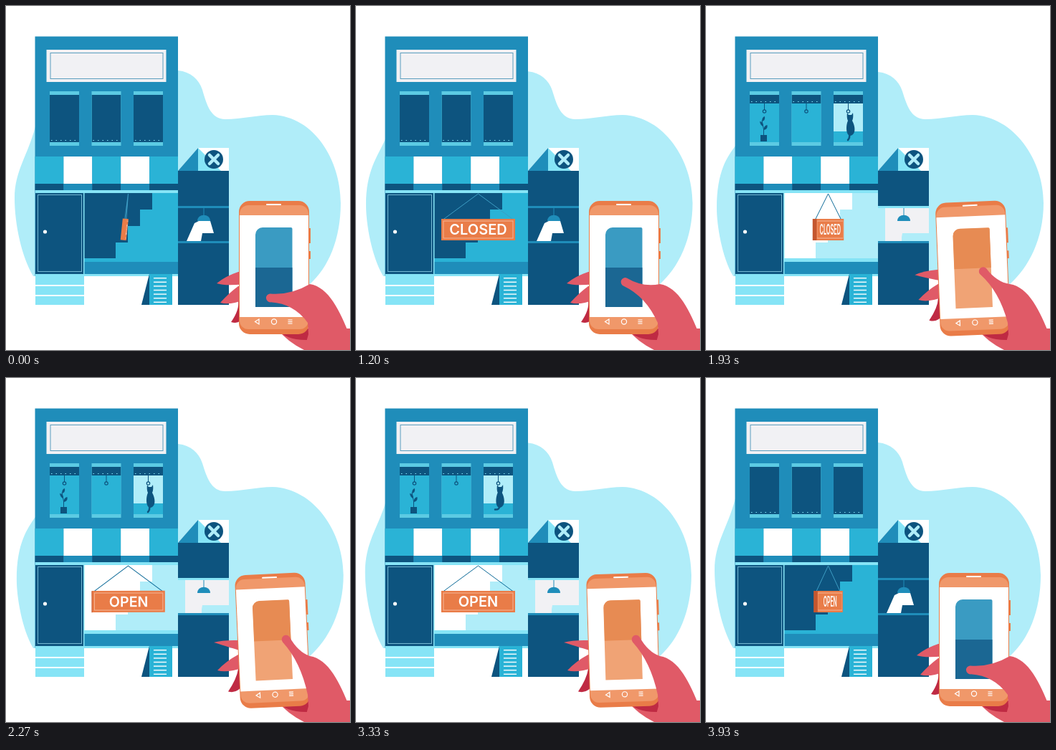
Write an HTML page with a canvas that moves like this. It is 480 by 480 pixels and loops after 3990 ms.

```html
<!DOCTYPE html>
<html lang="en">
<head>
<meta charset="utf-8">
<title>Shop opening</title>
<style>
html, body { margin: 0; width: 100%; height: 100%; overflow: hidden; background: #fff; }
canvas { display: block; width: 480px; height: 480px; }
</style>
</head>
<body>
<canvas id="stage" width="480" height="480"></canvas>
<script>
const ctx = document.getElementById('stage').getContext('2d');
const LOOP = 3990, HALF = LOOP / 2;
const NAVY = '#0d547f', BLUE = '#1f8dba', TEAL = '#2ab3d6', SKY = '#5ccbe3',
      PALE = '#b0edf9', ICE = '#86e4f6', WHITE = '#ffffff', PAPER = '#f1f1f4',
      ORANGE = '#e97c48', PEACH = '#f0986a', PINK = '#e05a67', RED = '#bf2a43';

const clamp = x => Math.max(0, Math.min(1, x));
const lerp = (a, b, k) => a + (b - a) * k;
const smooth = x => { x = clamp(x); return x * x * (3 - 2 * x); };
const span = (t, a, b) => smooth((t - a) / (b - a));
// Rises during a..b, falls during c..d
const pulse = (t, a, b, c, d) => span(t, a, b) * (1 - span(t, c, d));

function mix(a, b, k) {
  const part = (c, i) => parseInt(c.substr(1 + i * 2, 2), 16);
  return 'rgb(' + [0, 1, 2].map(i => Math.round(lerp(part(a, i), part(b, i), k))) + ')';
}

function rect(x, y, w, h, fill) {
  ctx.fillStyle = fill;
  ctx.fillRect(x, y, w, h);
}

function round(x, y, w, h, r, fill) {
  ctx.beginPath();
  ctx.roundRect(x, y, w, h, r);
  ctx.fillStyle = fill;
  ctx.fill();
}

function shape(fill, d) {
  ctx.fillStyle = fill;
  ctx.fill(new Path2D(d));
}

function stroke(color, width, d) {
  ctx.strokeStyle = color;
  ctx.lineWidth = width;
  ctx.stroke(new Path2D(d));
}

function frame(x, y, w, h, color) {
  ctx.strokeStyle = color;
  ctx.lineWidth = 1;
  ctx.strokeRect(x + .5, y + .5, w - 1, h - 1);
}

function circle(x, y, r) {
  ctx.beginPath();
  ctx.arc(x, y, r, 0, 7);
}

function disc(x, y, r, fill) {
  circle(x, y, r);
  ctx.fillStyle = fill;
  ctx.fill();
}

function ring(x, y, r, color) {
  circle(x, y, r);
  ctx.strokeStyle = color;
  ctx.lineWidth = 1.2;
  ctx.stroke();
}

function pose(x, y, angle, draw) {
  ctx.save();
  ctx.translate(x, y);
  ctx.rotate(angle * Math.PI / 180);
  draw();
  ctx.restore();
}

function blob(t) {
  const s = Math.sin(Math.PI * t / LOOP) ** 2;
  const left = 12 + 3 * s, right = 467 + 4 * s, top = 90 + 2 * s;
  shape(PALE, `M200 ${top} H240 C258 ${top + 2} 269 ${top + 12} 274 ${top + 27} ` +
    `C280 138 286 158 306 158 C330 158 350 152 372 152 ` +
    `C430 154 ${right} 215 ${right} 275 C${right} 325 450 365 424 388 L400 377 H38 ` +
    `C22 350 ${left} 305 ${left} ${268 + 14 * s} C${left} 230 30 210 41 ${168 + 27 * s} Z`);
}

function plant() {
  rect(76, 180, 9, 9, NAVY);
  stroke(NAVY, 1, 'M80.5 181 V172 L78 160');
  for (const [x, y, side] of [[80.5, 173, 5], [80, 168, -5], [78, 161, 4]])
    shape(NAVY, `M${x} ${y} q0 -6 ${side} -7 q1 6 ${-side} 7`);
}

function cat(t) {
  const sit = pulse(t, 2300, 2700, 3150, 3550);
  pose(201, 152, 3 * sit, () => shape(NAVY,
    'M-4 -3 L-2 0 H2 L4 -3 Q5 4 3 8 C8 17 8 28 0 29 C-6 28 -6 15 -3 8 Q-5 4 -4 -3 Z'));
  ctx.lineCap = 'round';
  stroke(NAVY, 2.5, `M200 178 Q201 184 ${198 - 7 * sit} ${187 - 6 * sit}`);
  ctx.lineCap = 'butt';
}

function upperWindow(t, i, extra) {
  const x = 61 + 58.5 * i, mid = x + 20.5, rise = 1390 + 52 * i;
  const end = lerp(190, 136, pulse(t, rise, rise + 350, 3630, 3890));
  rect(x, 119, 41, 76, SKY);
  ctx.save();
  ctx.beginPath();
  ctx.rect(x, 124, 41, 66);
  ctx.clip();
  rect(x, 124, 41, 66, TEAL);
  if (extra) extra(t);
  rect(x, 124, 41, end - 124, NAVY);
  ctx.setLineDash([1.5, 5]);
  stroke(ICE, 1, `M${x + 2} ${end - 2.5} h39`);
  ctx.setLineDash([]);
  stroke(NAVY, 1, `M${mid} ${end} v9`);
  ring(mid, end + 11, 2.2, NAVY);
  ctx.restore();
}

function facade(t) {
  rect(40.5, 42.5, 199.5, 334, BLUE);
  rect(56.5, 61, 167, 45, PAPER);
  frame(61.5, 65, 158, 37, '#5a9dbd');
  upperWindow(t, 0, plant);
  upperWindow(t, 1);
  upperWindow(t, 2, now => {
    rect(178, 124, 41, 51, PALE);
    cat(now);
  });
  for (let i = 0; i < 5; i++) {
    const x = 40.5 + i * 39.9;
    rect(x, 210, 39.9, 38, i % 2 ? WHITE : TEAL);
    rect(x, 248, 39.9, 9, i % 2 ? BLUE : NAVY);
  }
  rect(41, 257, 199, 4, ICE);
}

function groundFloor(light) {
  rect(109, 261, 131, 91, mix(NAVY, WHITE, light));
  const stair = mix(TEAL, PALE, light);
  rect(204, 261, 36, 23, stair);
  for (let i = 0; i < 4; i++) rect(204 - 17 * i, 261 + 23 * i, 36 + 17 * i, 23, stair);
  rect(109, 352, 131, 5, mix(TEAL, ICE, light));
  rect(109, 357, 131, 17, BLUE);
  rect(41, 374, 199, 3, ICE);
  rect(41, 261, 68, 113, NAVY);
  frame(44, 263, 62, 108, '#75b9d4');
  rect(108, 261, 1.5, 113, ICE);
  disc(54.5, 315, 2.6, WHITE);

  for (let i = 0; i < 3; i++) rect(41, 377 + 14 * i, 68, 12, ICE);
  shape(NAVY, 'M200 374 L189 417 H201 Z');
  rect(200, 374, 32, 43, TEAL);
  for (let y = 379; y < 415; y += 5.6) rect(206, y, 18, 1.4, WHITE);
}

function annex(t, light) {
  rect(240, 198, 71, 32, WHITE);
  shape(PALE, 'M240 198 H268 L240 230 Z');
  shape(BLUE, 'M268 198 V230 H240 Z');
  shape(ICE, 'M268 198 L300 230 H268 Z');
  disc(290, 214, 13, NAVY);
  const turn = 45 + 90 * (span(t, 1420, 1920) + span(t, 3420, 3920));
  pose(290, 214, turn, () => {
    ctx.lineCap = 'round';
    stroke(PALE, 4.5, 'M-8.5 0 H8.5 M0 -8.5 V8.5');
  });

  const wall = mix(NAVY, PAPER, light);
  rect(240, 230, 71, 187, NAVY);
  rect(240, 279, 71, 4, mix(BLUE, ICE, light));
  rect(240, 282, 71, 46, mix(NAVY, PALE, light));
  shape(wall, 'M250 282 H311 V317 H273 V328 H250 Z');
  shape(mix(WHITE, PAPER, light), 'M269 300 H285 L290 317 H274 L272 328 H252 L263 303 Z');
  rect(240, 328, 71, 3, BLUE);
  stroke(BLUE, 1, 'M276 282 V293');
  shape(BLUE, 'M267 300 C267 289 285 289 285 300 Z');
}

function sign(t, light) {
  const word = t > HALF ? 'OPEN' : 'CLOSED';
  // Time relative to the nearest edge-on moment
  let tau = t % HALF;
  if (tau > HALF - 340) tau -= HALF;
  const p = clamp((tau + 340) / 680);
  const turn = Math.PI * (p + .5 - .5 * Math.cos(Math.PI * p)) / 2;
  const sx = Math.max(.02, Math.abs(Math.cos(turn)));
  const edge = 6 * Math.sin(turn);
  const tilt = tau < 0 ? 6 * clamp(1 + tau / 50)
    : 6 * Math.exp(-tau / 700) * Math.cos(2 * Math.PI * tau / 1080) * (1 - span(tau, 600, 1100));

  pose(170.5, 262, tilt, () => {
    const reach = 49 * sx;
    stroke(mix('#3d9dc4', '#0d6a98', light), 1, `M${-reach} 36 L0 0 L${reach} 36`);
    if (edge > .3) rect(-51.5 * sx - edge / 2, 35, edge + 1, 30, sx < .2 ? ORANGE : '#c4572f');
    ctx.translate(edge / 2, 50);
    ctx.scale(sx, 1);
    rect(-51.5, -15, 103, 30, ORANGE);
    frame(-49, -12.5, 98, 25, '#f6b596');
    ctx.fillStyle = WHITE;
    ctx.textAlign = 'center';
    ctx.font = '600 20px Inter, "Open Sans", sans-serif';
    ctx.fillText(word, 0, 7.3);
  });
}

function fingers(lift) {
  for (let i = 2; i >= 0; i--) {
    const x = 294 + 5 * i * i - 4 * lift;
    const y = 387 + 27 * i - 18 * lift / (1 + 2 * i);
    const top = 371 + 20 * i - 5 * lift, low = 388 + 22 * i - 6 * lift;
    shape(i === 2 ? RED : PINK,
      `M332 ${top} L324 ${top} Q${x + 12} ${(top + y) / 2 - 2} ${x} ${y} Q${x + 13} ${y + 4} 332 ${low} Z`);
  }
}

function phone(tilt, slide) {
  pose(376 - tilt, 385 + 1.2 * tilt, -2.6 * tilt, () => {
    ctx.translate(-376, -385);
    rect(421, 310, 4, 21, ORANGE);
    rect(421, 342, 4, 11, ORANGE);
    round(325, 272, 98, 186, 15, ORANGE);
    round(326, 278, 96, 173, 12, PEACH);
    rect(326, 292, 96, 142, WHITE);
    ctx.lineCap = 'round';
    stroke(WHITE, 2, 'M364 277 H383');
    ctx.lineCap = 'butt';

    ctx.save();
    round(348, 309, 51.5, 111, [10, 2, 0, 0], mix('#3a9bc2', '#f0a375', slide));
    ctx.clip();
    rect(348, lerp(365, 309, slide), 52, 56, mix('#1b6793', '#e78b53', slide));
    ctx.restore();

    stroke(WHITE, 1.2, 'M353 437 L347.5 440.5 L353 444 Z');
    ring(374, 440.5, 3.6, WHITE);
    for (let y = 438; y < 444; y += 2.5) rect(393.5, y - .5, 6, 1.1, WHITE);
  });
}

// Palm with a thumb reaching to (x, y)
function hand(x, y) {
  const base = { x: 424, y: 388 }, heel = { x: 421, y: 442 };
  const aim = Math.atan2(402 - y, 420 - x), r = 6;
  const cx = x + r * Math.cos(aim), cy = y + r * Math.sin(aim);
  ctx.beginPath();
  ctx.moveTo(480, 480);
  ctx.lineTo(480, 461);
  ctx.bezierCurveTo(466, 425, 450, 392, base.x, base.y);
  ctx.quadraticCurveTo(lerp(x, base.x, .55), lerp(y, base.y, .55) + 7,
    cx + r * Math.sin(aim), cy - r * Math.cos(aim));
  ctx.arc(cx, cy, r, aim - Math.PI / 2, aim + Math.PI / 2, true);
  ctx.quadraticCurveTo(lerp(x, heel.x, .6) + 4, lerp(y, heel.y, .6) - 13, heel.x, heel.y);
  ctx.lineTo(422, 458);
  ctx.lineTo(416, 480);
  ctx.fillStyle = PINK;
  ctx.fill();
}

function render(t) {
  const light = pulse(t, 1580, 1740, 3690, 3890);
  const slide = pulse(t, 1540, 1860, 3570, 3850);
  const tilt = pulse(t, 1300, 2100, 3100, 3690);
  const lift = pulse(t, 1600, 2150, 3450, 3890);
  // The thumb rests low, lifts to the knob, then pushes it up and drags it down
  const ready = pulse(t, 120, 450, 3660, 3890);
  const push = pulse(t, 1600, 2100, 3400, 3890);
  const x = 363 + 7 * ready + 17 * push;
  const y = 408 - 25 * ready - 23 * push;

  rect(0, 0, 480, 480, WHITE);
  blob(t);
  facade(t);
  groundFloor(light);
  annex(t, light);
  sign(t, light);
  fingers(lift);
  shape(PINK, 'M378 450 Q392 468 416 480 H480 V450 Z');
  shape(RED, 'M378 450 Q390 467 422 466 L430 450 Z');
  phone(tilt, slide);
  hand(x, y);
}

const start = performance.now();
function tick() {
  render((performance.now() - start) % LOOP);
  requestAnimationFrame(tick);
}
tick();
</script>
</body>
</html>
```
